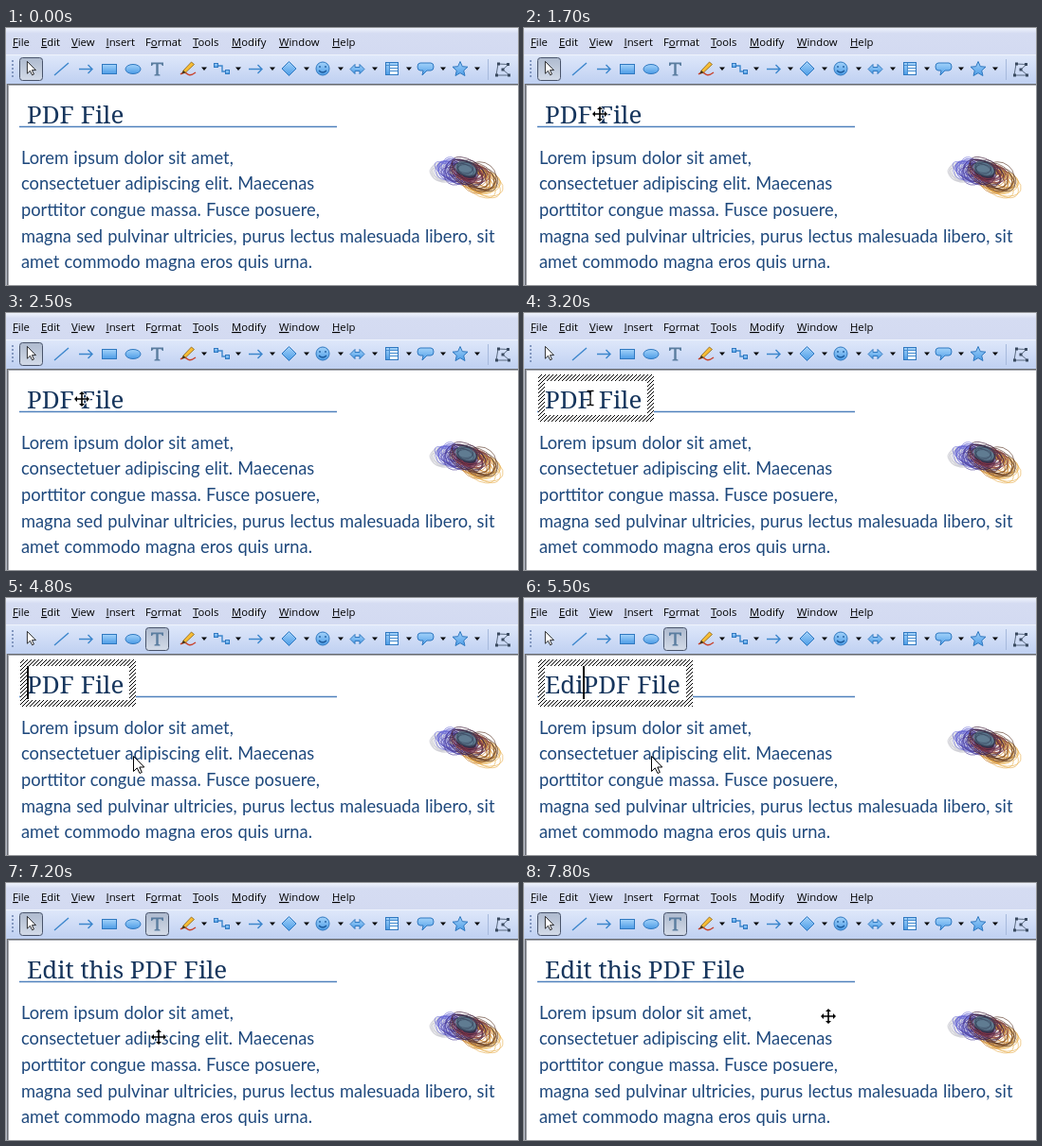
An HTML page that plays this animation: 540x272 px, repeating every 8000 ms.

```html
<!DOCTYPE html>
<html lang="en">
<head>
<meta charset="utf-8">
<title>Editing a PDF title</title>
<style>
  html, body { margin: 0; width: 100%; height: 100%; overflow: hidden; background: #fff; }
  svg { display: block; width: 540px; height: 272px; }
  text { white-space: pre; }
  .menu { font: 11.3px "Open Sans", sans-serif; fill: #000; }
  .menu tspan { text-decoration: underline; }
  .title { font: 26px "Noto Serif", serif; fill: #17365d; }
  .body { font: 18.3px Lato, sans-serif; word-spacing: .6px; fill: #1f497d; }
  .icon { fill: none; stroke: #3c86cc; stroke-width: 1.4; }
  .solid { fill: url(#blue); stroke: #2f78c0; stroke-width: 1; }
  .pressed { fill: url(#down); stroke: #48536a; }
  .crisp { shape-rendering: crispEdges; }
</style>
</head>
<body>
<svg viewBox="0 0 540 272">
  <defs>
    <linearGradient id="top" x2="0" y2="1">
      <stop stop-color="#eef2fb"/><stop offset=".2" stop-color="#d5dcf2"/><stop offset="1" stop-color="#d3daf1"/>
    </linearGradient>
    <linearGradient id="bar" x2="0" y2="1">
      <stop stop-color="#dfe8fa"/><stop offset=".5" stop-color="#cfdcf6"/><stop offset="1" stop-color="#bfd0f1"/>
    </linearGradient>
    <linearGradient id="blue" x2="0" y2="1">
      <stop stop-color="#a3d2fa"/><stop offset="1" stop-color="#4c9ce6"/>
    </linearGradient>
    <linearGradient id="down" x2="0" y2="1">
      <stop stop-color="#aebace"/><stop offset="1" stop-color="#d3dbe8"/>
    </linearGradient>
    <pattern id="hatch" width="4" height="4" patternUnits="userSpaceOnUse">
      <path d="M0 0h4v4h-4z" fill="#fff"/>
      <path d="M3 0h1v1h-1zM2 1h1v1h-1zM1 2h1v1h-1zM0 3h1v1h-1z"/>
    </pattern>
    <path id="pointer" d="M.5 .5V16.5L4.3 12.9L7 18.5L9.3 17.5L6.8 12H11.8Z" fill="#fff" stroke="#000" stroke-linejoin="round"/>
  </defs>

  <rect width="540" height="272" fill="#fff"/>
  <rect width="540" height="29" fill="url(#top)"/>
  <rect y="28" width="540" height="31" fill="url(#bar)"/>
  <path class="crisp" d="M0 28.5H540" stroke="#eef3fc"/>
  <path class="crisp" d="M.5 59V272" stroke="#b6bcc8"/>
  <path class="crisp" d="M540 59.5H1.5V272" fill="none" stroke="#696c72"/>
  <path class="crisp" d="M540 60.5H2.5V272" fill="none" stroke="#a4a7ad"/>

  <g class="menu">
    <text x="7" y="19"><tspan>F</tspan>ile</text>
    <text x="37" y="19"><tspan>E</tspan>dit</text>
    <text x="69" y="19"><tspan>V</tspan>iew</text>
    <text x="105.500" y="19"><tspan>I</tspan>nsert</text>
    <text x="147" y="19">F<tspan>o</tspan>rmat</text>
    <text x="197" y="19"><tspan>T</tspan>ools</text>
    <text x="238" y="19"><tspan>M</tspan>odify</text>
    <text x="288" y="19"><tspan>W</tspan>indow</text>
    <text x="344" y="19"><tspan>H</tspan>elp</text>
  </g>

  <rect id="selectOn" class="pressed" x="14.5" y="31.5" width="24" height="24" rx="3"/>
  <rect id="typeOn" class="pressed" x="147.5" y="31.5" width="24" height="24" rx="3"/>
  <path d="M7 34V54" stroke="#8297bf" stroke-width="2" stroke-dasharray="2 2"/>
  <use href="#pointer" transform="translate(22 35) scale(.8)"/>
  <g class="icon">
    <path d="M51 50L66 37"/>
    <path d="M77 43.5H91M86.5 39L91 43.5L86.5 48"/>
    <path d="M256 43.5H270M265.5 39L270 43.5L265.5 48"/>
    <path d="M222 40H228V46H233"/>
    <path d="M517 50L519 38L530 38.5L524 44L531 50Z" stroke="#5a6a80" stroke-width="1"/>
  </g>
  <g class="solid">
    <rect x="101.500" y="38.500" width="15" height="10"/>
    <ellipse cx="134" cy="43.500" rx="8" ry="5"/>
    <rect x="219.500" y="37.500" width="4" height="4"/>
    <rect x="231.500" y="44.500" width="4" height="4"/>
    <path d="M298.500 35.500L306 43L298.500 50.500L291 43Z"/>
    <circle cx="334" cy="43" r="7"/>
    <path d="M363 43.500L368 38.500V41.500H373V38.500L378 43.500L373 48.500V45.500H368V48.500Z"/>
    <rect x="400.500" y="36.500" width="13" height="13"/>
    <path d="M437 37H448Q451 37 451 41T448 45H444L439 50L440 45H437Q434 45 434 41T437 37Z"/>
    <path d="M479 35.500L481.300 40.700L487 41.200L482.700 45L484 50.500L479 47.600L474 50.500L475.300 45L471 41.200L476.700 40.700Z"/>
  </g>
  <path d="M331 40v2M337 40v2M330 45q4 4 8 0" fill="none" stroke="#1c5b9c" stroke-width="1.300"/>
  <path d="M405 40H413V49H405Z" fill="#eaf5ff"/>
  <path d="M401 39.500H413M404.500 37V49M405 42.500H413M405 45.500H413" stroke="#4b8fd0"/>
  <path d="M153 36.500H166V40H165L163.500 38.300H160.700V48.800L162.500 49.500V50.500H156.500V49.500L158.300 48.800V38.300H155.500L154 40H153Z" fill="#5a7d9f"/>
  <path d="M184 49Q188 45.500 191 48.500T200 47" fill="none" stroke="#c8402a" stroke-width="1.500"/>
  <path d="M187 45L195.500 36L198.500 38.500L189.500 47L186 48Z" fill="#f7bd34" stroke="#8a6420" stroke-width=".8"/>
  <path d="M187 45L189.500 47L185.500 48.500Z" fill="#3a3022"/>
  <path d="M516 48.500h3v3h-3zM518 36.500h3v3h-3zM528 37h3v3h-3zM522.500 42.500h3v3h-3zM529 48.500h3v3h-3z" fill="#39495f"/>
  <path d="M508.500 33V55" stroke="#a6b9dc"/>
  <path id="drops"/>

  <g id="page">
    <path d="M14 104.500H349" stroke="#4f81bd" stroke-width="1.400"/>
    <g id="scribble" fill="none"></g>
    <g class="body">
      <text x="16" y="143.500">Lorem ipsum dolor sit amet,</text>
      <text x="16" y="171">consectetuer adipiscing elit. Maecenas</text>
      <text x="16" y="199">porttitor congue massa. Fusce posuere,</text>
      <text x="16" y="226.500">magna sed pulvinar ultricies, purus lectus malesuada libero, sit</text>
      <text x="16" y="254">amet commodo magna eros quis urna.</text>
    </g>
    <g id="editor" class="crisp">
      <rect id="frame" x="15" y="65" height="50" fill="url(#hatch)"/>
      <rect id="field" x="22" y="72" height="36" fill="#fff"/>
    </g>
    <text id="title" class="title" x="22" y="101"></text>
    <rect id="caret" class="crisp" y="72" width="2" height="35"/>
  </g>

  <g id="move">
    <path d="M0-8L3-5H.8V-.8H5V-3L8 0L5 3V.8H.8V5H3L0 8L-3 5H-.8V.8H-5V3L-8 0L-5-3V-.8H-.8V-5H-3Z" stroke="#fff" stroke-width="1.600" paint-order="stroke"/>
  </g>
  <g id="beam">
    <path d="M-3.500-7.500H-1L0-6.500L1-7.500H3.500M0-6.500V6.500M-3.500 7.500H-1L0 6.500L1 7.500H3.500" fill="none" stroke="#000" stroke-width="1.300"/>
  </g>
  <g id="arrow"><use href="#pointer"/></g>
</svg>
<script>
const LOOP = 8000, STEP = 100;
const TYPED = "Edit this ", BASE = "PDF File";
const $ = id => document.getElementById(id);
const show = (id, on) => { $(id).style.display = on ? "" : "none"; };
const within = (t, a, b) => t >= a && t < b;

// Times at which each typed letter, and the frame around it, appears
const letterTimes = [5100, 5300, 5500, 5600, 5700, 5800, 6000, 6100, 6200, 6300];
const frameTimes = [5100, 5400, 5500, 5600, 5700, 5900, 6100, 6100, 6200, 6400];
const refreshTimes = [2000, 2400, 2700, 7100];

// kind, start, end of travel, hidden at, from x, y, to x, y
const moves = [
  ["move", 500, 700, 800, 303, 246, 279, 226],
  ["move", 1300, 1700, 2800, 115, 140, 80, 91],
  ["beam", 2800, 3200, 3700, 78, 91, 70, 90],
  ["beam", 3700, 3800, 3900, 78, 80, 90, 95],
  ["arrow", 3900, 4200, 7200, 104, 117, 134, 167],
  ["move", 7200, 7800, 8000, 161, 163, 321, 141]
];

const ruler = document.createElement("canvas").getContext("2d");
ruler.font = '26px "Noto Serif", serif';
const widthOf = s => ruler.measureText(s).width;
const fieldWidth = n => Math.floor(widthOf(TYPED.slice(0, n) + BASE) + 6.6);

function drawScribble() {
  let seed = 7;
  const rnd = () => (seed = seed * 16807 % 2147483647) / 2147483647;
  const cluster = (n, stroke, cx, cy, rx, ry, spread, fill = "none") => {
    for (let i = 0; i < n; i++) {
      const e = document.createElementNS("http://www.w3.org/2000/svg", "ellipse");
      const x = cx + (rnd() - .5) * spread, y = cy + (rnd() - .5) * spread * .6;
      const set = { cx: x, cy: y, rx: rx * (.6 + rnd() * .5), ry: ry * (.6 + rnd() * .5),
        stroke, fill, "stroke-width": .6, transform: `rotate(${rnd() * 40} ${x} ${y})` };
      for (const k in set) e.setAttribute(k, set[k]);
      $("scribble").append(e);
    }
  };
  cluster(11, "#cfcfd6", 460, 153, 12, 9, 8);
  cluster(18, "#6f6fd6", 469, 150, 14, 10, 12);
  cluster(12, "#e8b254", 501, 162, 18, 12, 12);
  cluster(10, "#c47f32", 500, 160, 17, 12, 14);
  cluster(5, "#5c3a28", 496, 157, 19, 13, 12);
  cluster(7, "#4a3c96", 477, 154, 16, 11, 12);
  cluster(2, "#2a2038", 485, 151, 16, 11, 3, "#372d48");
  cluster(9, "#43203c", 486, 152, 19, 12, 7);
  cluster(5, "#8a3a4c", 489, 153, 18, 12, 6);
  cluster(1, "#6f8a98", 485, 149, 11, 7, 0, "#607c92");
  cluster(5, "#38465e", 485, 149, 12, 7, 5);
}

function drawCursor(t) {
  const active = moves.find(m => within(t, m[1], m[3]));
  for (const kind of ["move", "beam", "arrow"]) show(kind, active && active[0] === kind);
  if (!active) return;
  const [kind, start, end, , x0, y0, x1, y1] = active;
  const p = Math.min(1, (t - start) / (end - start));
  const x = Math.round(x0 + (x1 - x0) * p), y = Math.round(y0 + (y1 - y0) * p);
  $(kind).setAttribute("transform", `translate(${x} ${y})`);
}

function render(now) {
  const t = Math.floor(now % LOOP / STEP) * STEP;
  const letters = letterTimes.filter(k => k <= t).length;
  const framed = frameTimes.filter(k => k <= t).length;

  show("selectOn", t < 2700 || t >= 7100);
  show("typeOn", t >= 3500);
  show("editor", within(t, 2800, 7100));
  show("caret", within(t, 4800, 6900));
  $("page").setAttribute("opacity", refreshTimes.includes(t) ? .5 : 1);

  $("title").textContent = TYPED.slice(0, letters) + BASE;
  $("caret").setAttribute("x", 22 + Math.round(widthOf(TYPED.slice(0, letters))));
  $("field").setAttribute("width", fieldWidth(letters));
  $("frame").setAttribute("width", fieldWidth(framed) + 14);
  drawCursor(t);
}

const dropXs = Array.from({ length: 9 }, (_, i) => 209 + 36 * i);
$("drops").setAttribute("d", dropXs.map(x => `M${x - 3} 41.500h6l-3 3.500z`).join(""));
drawScribble();

const tick = () => { render(performance.now()); requestAnimationFrame(tick); };
tick();
</script>
</body>
</html>
```
